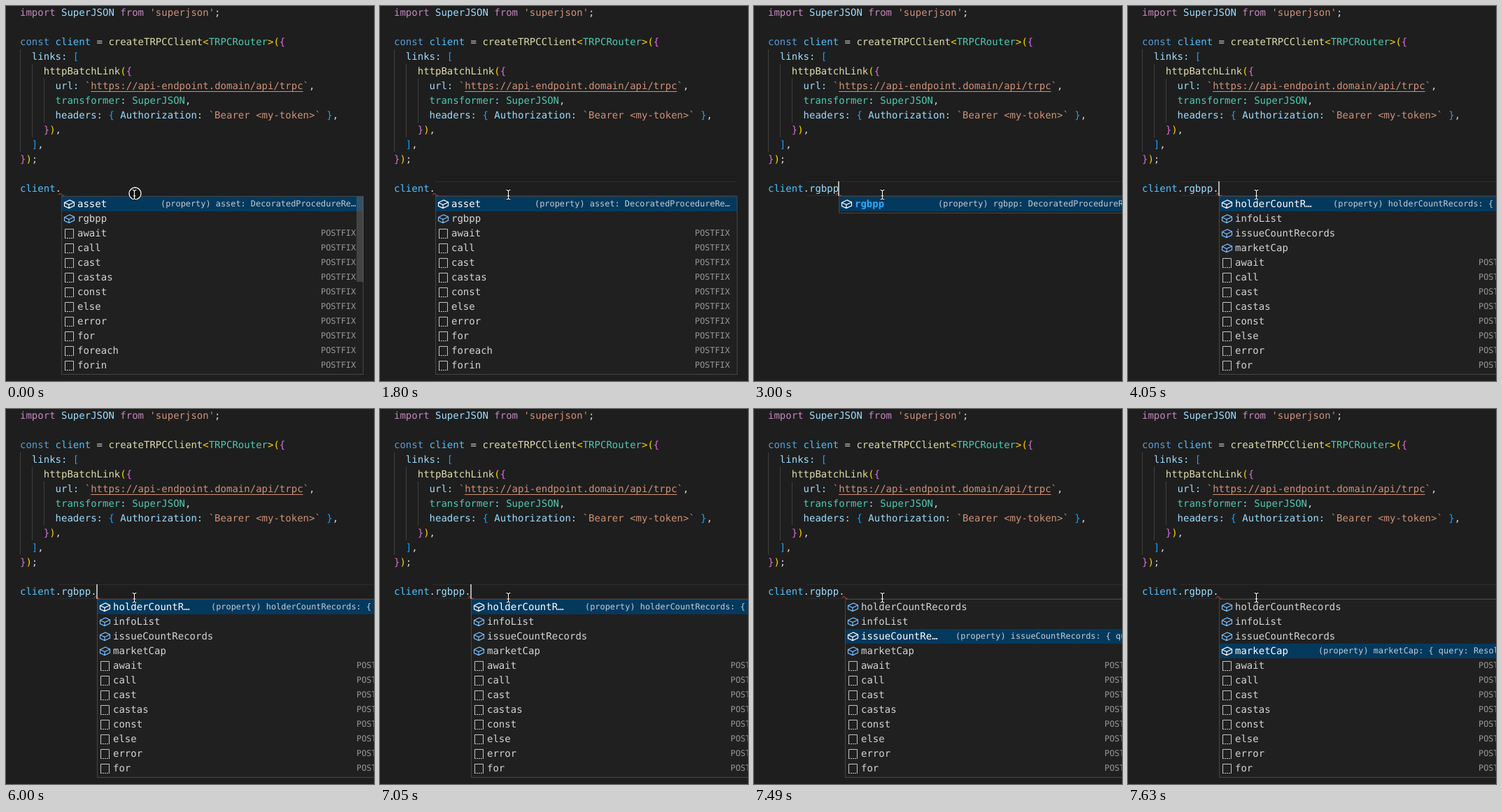
Write an HTML page with a canvas that moves like this. It is 526x537 px and loops after 8000 ms.

```html
<!DOCTYPE html>
<html lang="en">
<head>
<meta charset="utf-8">
<title>Editor autocomplete</title>
<style>
  html, body { margin: 0; width: 100%; height: 100%; overflow: hidden; background: #1e1e1e; }
  canvas { display: block; }
</style>
</head>
<body>
<canvas id="stage" width="526" height="537"></canvas>
<script>
const ctx = document.getElementById('stage').getContext('2d');
const LOOP = 8000, CHAR = 8.428, ROW = 21, LEFT = 20;
const POPUP_TOP = 272, POPUP_WIDTH = 432;
const FONT = '"DejaVu Sans Mono", monospace';
const C = {
  key: '#c586c0', name: '#9cdcfe', string: '#ce9178', keyword: '#569cd6', constant: '#4fc1ff',
  func: '#dcdcaa', type: '#4ec9b0', plain: '#d4d4d4', gold: '#ffd700', pink: '#da70d6', blue: '#179fff'
};

// Each line: indent, then [text, colour] runs.
const CODE = [
  [0, ['import', 'key'], [' SuperJSON', 'name'], [' from', 'key'], [" 'superjson'", 'string'], [';', 'plain']],
  [0],
  [0, ['const', 'keyword'], [' client', 'constant'], [' = ', 'plain'], ['createTRPCClient', 'func'], ['<', 'gold'],
    ['TRPCRouter', 'type'], ['>(', 'gold'], ['{', 'pink']],
  [2, ['links: ', 'name'], ['[', 'blue']],
  [4, ['httpBatchLink', 'func'], ['(', 'gold'], ['{', 'pink']],
  [6, ['url: ', 'name'], ['`https://api-endpoint.domain/api/trpc`', 'string'], [',', 'plain']],
  [6, ['transformer', 'type'], [': ', 'name'], ['SuperJSON', 'type'], [',', 'plain']],
  [6, ['headers: ', 'name'], ['{', 'blue'], [' Authorization: ', 'name'], ['`Bearer <my-token>`', 'string'],
    [' }', 'blue'], [',', 'plain']],
  [4, ['}', 'pink'], [')', 'gold'], [',', 'plain']],
  [2, [']', 'blue'], [',', 'plain']],
  [0, ['}', 'pink'], [')', 'gold'], [';', 'plain']]
];

const SNIPPETS = ['await', 'call', 'cast', 'castas', 'const', 'else', 'error', 'for', 'foreach', 'forin'];
const property = (label, type, short = label, detailX = 142) =>
  ({ label, short, detailX, detail: `(property) ${label}: ${type}` });
const snippet = label => ({ label });
const PROCEDURE = 'DecoratedProcedureRe…', QUERY = '{ query: Resolver…';
const rgbpp = property('rgbpp', PROCEDURE);
const ROOT_ITEMS = [property('asset', PROCEDURE), rgbpp, ...SNIPPETS.map(snippet)];
const MEMBER_ITEMS = [
  property('holderCountRecords', QUERY, 'holderCountR…', 163),
  property('infoList', QUERY),
  property('issueCountRecords', QUERY, 'issueCountRe…', 158),
  property('marketCap', QUERY),
  ...SNIPPETS.slice(0, 8).map(snippet)
];

const TYPING = [[0, ''], [2100, 'r'], [2250, 'rg'], [2400, 'rgb'], [2700, 'rgbp'], [3000, 'rgbpp'], [3150, 'rgbpp.']];
const SELECTION = [[0, 0], [7340, 1], [7490, 2], [7630, 3]];
const CARET = [[0, 0], [300, 1], [750, 0], [1350, 1], [1800, 0], [2100, 1], [3600, 0], [4050, 1],
  [4650, 0], [5100, 1], [5550, 0], [6000, 1], [6600, 0], [7050, 1], [7490, 0]];
const valueAt = (steps, t) => steps.findLast(([start]) => t >= start)[1];

function rect(x, y, w, h, color) {
  ctx.fillStyle = color;
  ctx.fillRect(x, y, w, h);
}

function text(str, x, y, color, size = 14, weight = 'normal') {
  ctx.font = `${weight} ${size}px ${FONT}`;
  ctx.fillStyle = color;
  ctx.fillText(str, x, y);
}

function path(d, color, width = 1) {
  ctx.strokeStyle = color;
  ctx.lineWidth = width;
  ctx.stroke(new Path2D(d));
}

function drawCode() {
  [[20, 62, 147], [37, 83, 105], [54, 104, 63]].forEach(([x, y, h]) => rect(x, y, 1, h, '#404040'));
  CODE.forEach(([indent, ...runs], line) => {
    let col = indent;
    for (const [str, color] of runs) {
      text(str, LEFT + col * CHAR, 14 + line * ROW, C[color]);
      col += str.length;
    }
  });
  rect(LEFT + 12 * CHAR, 122, 36 * CHAR, 1, C.string);
}

function drawInput(t, typed, caretX) {
  if (t >= 300) {
    const start = t < 2100 ? 78 : 75, end = t < 2100 ? 510 : 526;
    rect(start, 251, end - start, 1, '#2d2d2d');
    rect(start, 271, end - start, 1, '#2d2d2d');
  }
  text('client', LEFT, 266, C.constant);
  text('.', LEFT + 6 * CHAR, 266, C.plain);
  text(typed.replace('.', ''), LEFT + 7 * CHAR, 266, C.name);
  if (typed.endsWith('.')) text('.', LEFT + 12 * CHAR, 266, C.plain);
  const x = Math.round(caretX);
  path(`M${x - 4} 270.5l2-2h1l3 3h1l1-1`, '#f14c4c');
  if (valueAt(CARET, t)) rect(x - 1, 251, 2, 21, '#aeafad');
}

function drawIcon(item, x, y, selected) {
  ctx.save();
  ctx.translate(x, y);
  if (item.detail) {
    path('M.5 5.5L8 2L14.5 5L14.5 10L7 13.5L.5 10.5ZM.5 5.5L7 8.5L14.5 5M7 8.5V13.5', selected ? '#fff' : '#75beff', 1.2);
  } else {
    path('M1.5 14V1.5H13.5V14', '#c5c5c5');
    ctx.setLineDash([2, 1]);
    path('M1 14.5H14', '#c5c5c5');
  }
  ctx.restore();
}

function drawPopup(items, selected, left, matched) {
  const height = items.length * ROW + 4;
  rect(left, POPUP_TOP, POPUP_WIDTH, height, '#454545');
  rect(left + 1, POPUP_TOP + 1, POPUP_WIDTH - 2, height - 2, '#202020');
  items.forEach((item, i) => {
    const y = POPUP_TOP + 1 + i * ROW, active = i === selected, labelX = left + 23;
    if (active) rect(left + 1, y, POPUP_WIDTH - 2, ROW, '#04395e');
    drawIcon(item, left + 4, y + 3, active);
    const label = active && item.short || item.label;
    text(label.slice(0, matched), labelX, y + 15, '#2aaaff', 14, 'bold');
    text(label.slice(matched), labelX + matched * CHAR, y + 15, active ? '#fff' : '#d4d4d4');
    if (!item.detail) text('POSTFIX', left + 371, y + 14, '#989898', 11.9);
    else if (active) text(item.detail, left + item.detailX, y + 14, '#c3ced6', 11.9);
  });
}

function drawPointer(clicked) {
  if (clicked) {
    ctx.beginPath();
    ctx.arc(184.5, 268.5, 8.5, 0, 2 * Math.PI);
    ctx.fillStyle = '#111';
    ctx.fill();
    ctx.strokeStyle = '#fff';
    ctx.lineWidth = 1.3;
    ctx.stroke();
  }
  const beam = 'M180.5 263.5H182L183.5 265L185 263.5H186.5M183.5 265V275.5M180.5 277H182L183.5 275.5L185 277H186.5M181.5 272H185.5';
  path(beam, '#000', 3);
  path(beam, '#fff', 1.2);
}

function draw(t) {
  const typed = valueAt(TYPING, t);
  const caretX = LEFT + (7 + typed.length) * CHAR, left = Math.round(caretX);
  const member = typed.endsWith('.');
  const items = member ? MEMBER_ITEMS : !typed ? ROOT_ITEMS : typed === 'r' ? [rgbpp, snippet('return')] : [rgbpp];

  rect(0, 0, 526, 537, '#1e1e1e');
  drawCode();
  drawInput(t, typed, caretX);
  drawPopup(items, valueAt(SELECTION, t), left, member ? 0 : typed.length);
  if (!typed) {
    const fade = Math.min(1, Math.max(0, (750 - t) / 600));
    rect(501, 273, 10, 122, `rgba(121,121,121,${0.4 * fade})`);
  }
  drawPointer(t < 150);
}

ctx.textRendering = 'geometricPrecision';
function frame(now) {
  draw(now % LOOP);
  requestAnimationFrame(frame);
}
draw(0);
requestAnimationFrame(frame);
</script>
</body>
</html>
```
